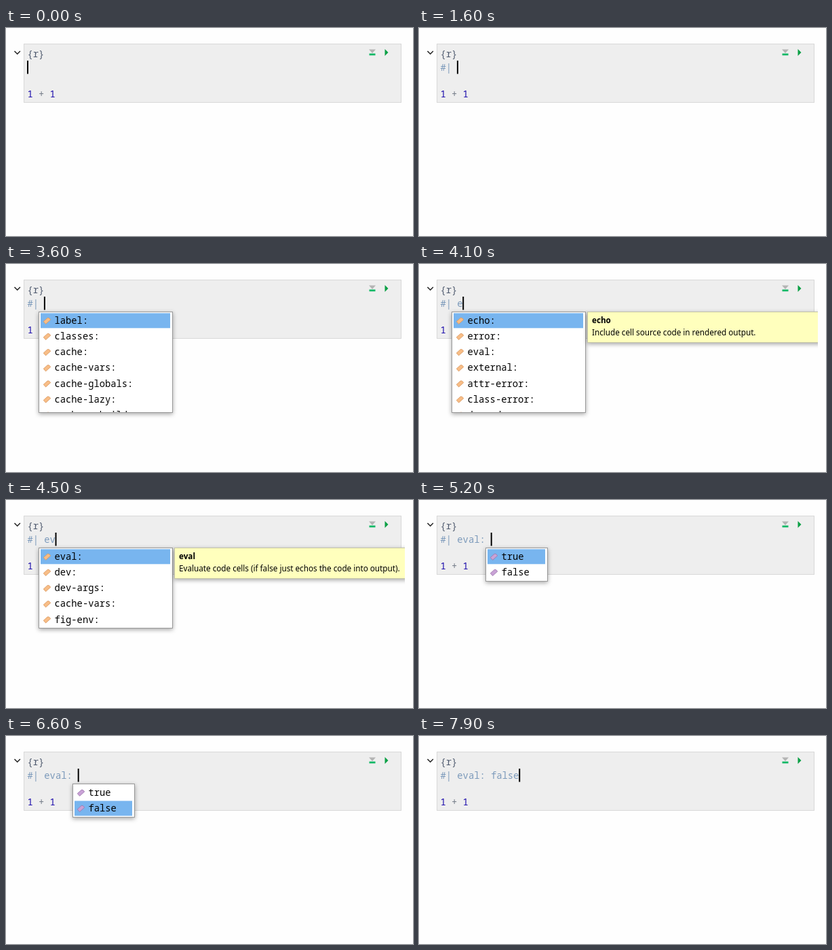
These frames come from a looping animation (600 by 306 pixels, 8 s). An HTML page:

```html
<!DOCTYPE html>
<html lang="en">
<head>
<meta charset="utf-8">
<title>Cell option completion</title>
<style>
  html, body { margin: 0; width: 100%; height: 100%; overflow: hidden; background: #fefefe; }
  svg { display: block; }
  text { white-space: pre; }
  .code { font: 13.8px "Noto Sans Mono", "DejaVu Sans Mono", monospace; }
  .tip { font: 11.7px "Noto Sans", sans-serif; }
  .key { font: 43.5px "Liberation Sans", Arial, sans-serif; }
  .shadow { filter: drop-shadow(0 2px 3px rgba(0, 0, 0, .35)); }
</style>
</head>
<body>
<svg width="600" height="306" viewBox="0 0 600 306">
  <clipPath id="edge"><path d="M0 0H588V306H0z"/></clipPath>
  <rect x="26.5" y="23.5" width="556" height="86" fill="#eee" stroke="#d8d8d8"/>
  <path d="M12.5 34l4.2 4.2 4.2-4.2" fill="none" stroke="#222" stroke-width="1.5"/>
  <path d="M535 31.5h10l-5 5.5z" fill="#b4b4b4"/>
  <path d="M535.5 37.5h9v2.8h-9z" fill="#12b866"/>
  <path d="M558.5 31l5 5-5 5z" fill="#0ca045"/>
  <g class="code">
    <text x="31.5" y="42.5" fill="#515c70">{r}</text>
    <text id="line" x="31.5" y="62.5" fill="#7c9abb"></text>
    <text x="31.5" y="102" fill="#1c0cab">1 <tspan fill="#737b87">+</tspan> 1</text>
  </g>
  <rect id="cursor" y="48" width="2" height="19.5"/>
  <g id="key" fill="#fa6e65">
    <text class="key" x="466.5" y="159">tab</text>
    <path d="M542 142.8h29v-4.8l8.5 5.5-8.5 5.5v-4.8h-29z"/>
  </g>
  <g clip-path="url(#edge)"><g id="overlay"></g></g>
</svg>
<script>
const LOOP = 8000, CHAR = 8.3, ROW = 23.15;
const $ = id => document.getElementById(id);

const options = (items, height, tip) =>
  ({ items, height, tip, x: 48, width: 197, selected: 0, icon: ["#f8bd86", "#d99a62"] });
const values = selected =>
  ({ items: ["true", "false"], height: 49, x: 98, width: 91, selected, icon: ["#c9a2d6", "#9d77ad"] });

const all = options(["label:", "classes:", "cache:", "cache-vars:", "cache-globals:",
  "cache-lazy:", "cache-rebuild:"], 148);
const startE = options(["echo:", "error:", "eval:", "external:", "attr-error:",
  "class-error:", "dependson:"], 148, ["echo", "Include cell source code in rendered output."]);
const startEv = options(["eval:", "dev:", "dev-args:", "cache-vars:", "fig-env:"], 118,
  ["eval", "Evaluate code cells (if false just echos the code into output)."]);

// Start time, typed line, completion popup
const steps = [
  [0, ""],
  [200, "#"],
  [300, "#|"],
  [400, "#| "],
  [3400, "#| ", all],
  [4000, "#| e", startE],
  [4400, "#| ev", startEv],
  [5200, "#| eval: ", values(0)],
  [6300, "#| eval: ", values(1)],
  [7100, "#| eval: false"]
];

function popup({ items, x, width, height, selected, icon, tip }) {
  const rows = items.map((item, i) => {
    const y = 83.3 + i * ROW;
    const bar = i === selected
      ? `<rect x="${x + 3}" y="${y - 11}" width="${width - 6}" height="22" fill="#78b5ef"/>` : "";
    return `${bar}<path d="M-4.8-2.5h8l1.6 1.6v3.4h-9.6z" transform="translate(${x + 12.5} ${y})
      rotate(-42)" fill="${icon[0]}" stroke="${icon[1]}" stroke-width=".8"/>
      <text class="code" x="${x + 23.5}" y="${y + 4.7}">${item}</text>`;
  }).join("");
  const note = tip ? `<g class="tip">
    <rect class="shadow" x="248.5" y="70.5" width="380" height="45" fill="#ffffbd" stroke="#c4c4a8"/>
    <text x="255" y="87" font-weight="700">${tip[0]}</text>
    <text x="255" y="105">${tip[1]}</text></g>` : "";
  return `<clipPath id="list"><rect x="${x}" y="70" width="${width}" height="${height}"/></clipPath>
    <rect class="shadow" x="${x + .5}" y="70.5" width="${width}" height="${height}"
      fill="#fff" stroke="#999"/><g clip-path="url(#list)">${rows}</g>${note}`;
}

const ramp = (t, from, to) => Math.min(1, Math.max(0, (t - from) / (to - from)));

let shown;
function draw(now) {
  const t = now % LOOP;
  const step = steps.findLast(s => s[0] <= t);
  if (step !== shown) {
    const [, line, list] = shown = step;
    $("line").textContent = line;
    $("cursor").setAttribute("x", 31 + line.length * CHAR);
    $("overlay").innerHTML = list ? popup(list) : "";
  }
  $("key").setAttribute("opacity", ramp(t, 2600, 2900) * (1 - ramp(t, 3300, 3600)));
}

const start = performance.now();
function tick() {
  draw(performance.now() - start);
  requestAnimationFrame(tick);
}
tick();
</script>
</body>
</html>
```
